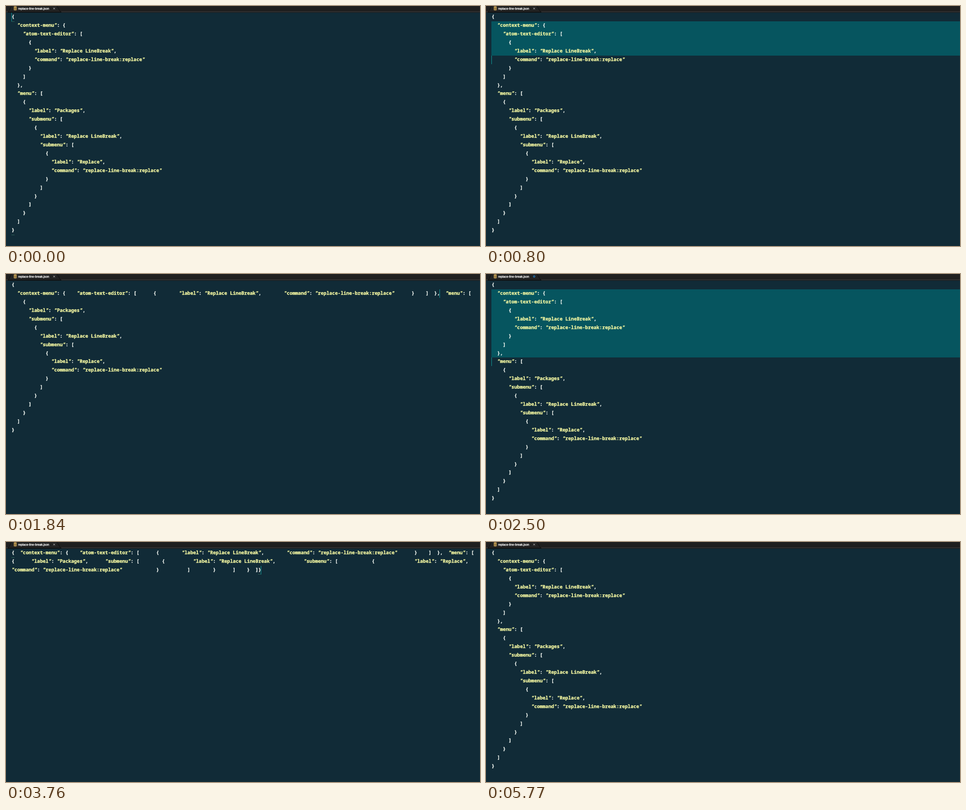
An HTML page that plays this animation: 1053 by 532 pixels, repeating every 5870 ms.

```html
<!DOCTYPE html>
<html lang="en">
<head>
<meta charset="utf-8">
<title>Replace line breaks</title>
<style>
  html, body { margin: 0; width: 100%; height: 100%; overflow: hidden; background: #112b37; }
  #stage { position: relative; width: 1053px; height: 532px; overflow: hidden; }
  #stage > * { position: absolute; }
  #tabs { left: 0; top: 0; }
  #tabs text { font: 6.8px "Liberation Sans", Arial, sans-serif; fill: #fff; stroke: #fff; stroke-width: .3px; text-rendering: geometricPrecision; }
  #code {
    left: 12.4px; top: 15.2px; width: 1040px; margin: 0;
    font: 600 10.5px/18.92px "Noto Sans Mono", "DejaVu Sans Mono", monospace;
    text-rendering: geometricPrecision;
    -webkit-text-stroke: .3px;
    white-space: pre-wrap; color: #f8fcf6;
  }
  #code span { color: #f8fba4; }
  #code i { position: relative; left: -.9px; }
  #selection { left: 12px; right: 0; background: #06555f; }
  #cursor { width: 1px; height: 19px; background: #109c9c; }
  .match { width: 7px; height: 1px; background: #2f6358; }
</style>
</head>
<body>
<div id="stage">
  <svg id="tabs" width="1053" height="15">
    <rect width="1053" height="15" fill="#1f1f1f"/>
    <path d="M0 13H1053" stroke="#484848"/>
    <path d="M0 14.4H1053" stroke="#111a1e"/>
    <path d="M4 13.5C8 12 10 1 14 -1H111C116 1 118 12 123 13.5Z" fill="#222" stroke="#0c0c0c"/>
    <g fill="#e9b95c">
      <ellipse cx="20.5" cy="2.3" rx="3.4" ry="1.3"/>
      <path id="disk" d="M17.1 3.4Q20.5 5.6 23.9 3.4V4.7Q20.5 6.8 17.1 4.7Z"/>
      <use href="#disk" y="2"/>
      <use href="#disk" y="4"/>
    </g>
    <text x="27" y="7.8">replace-line-break.json</text>
    <path id="close" d="M105 3.7L108.8 7.5M108.8 3.7L105 7.5" stroke="#d4d4d4" stroke-width=".9"/>
    <circle id="modified" cx="107" cy="5.6" r="1.8" fill="none" stroke="#2189d8" stroke-width="1.2"/>
  </svg>
  <div id="selection"></div>
  <pre id="code"></pre>
  <div class="match"></div>
  <div class="match"></div>
  <div id="cursor"></div>
</div>
<script>
const LOOP = 5870, LEFT = 12.4, TOP = 15.2, ROW = 18.92, COL = 6.3;

const lines = `{
  "context-menu": {
    "atom-text-editor": [
      {
        "label": "Replace LineBreak",
        "command": "replace-line-break:replace"
      }
    ]
  },
  "menu": [
    {
      "label": "Packages",
      "submenu": [
        {
          "label": "Replace LineBreak",
          "submenu": [
            {
              "label": "Replace",
              "command": "replace-line-break:replace"
            }
          ]
        }
      ]
    }
  ]
}`.split("\n");

const join = (from, to) =>
  [...lines.slice(0, from), lines.slice(from, to).join(""), ...lines.slice(to)].join("\n");
const full = lines.join("\n"), partial = join(1, 10), single = join(0, lines.length);
const partialEnd = lines.slice(1, 9).join("").length;

// Cursor is [row, column]; selected is the row after the selection, which starts at row 1.
const steps = [
  { at: 0, cursor: [0, 0], matches: [[0, 0], [25, 0]] },
  { at: 300, cursor: [1, 0] },
  ...[[500, 2], [650, 3], [800, 5], [950, 6], [1100, 7], [1240, 8], [1390, 9]]
    .map(([at, row]) => ({ at, cursor: [row, 0], selected: row })),
  { at: 1840, text: partial, cursor: [1, partialEnd] },
  { at: 2500, cursor: [9, 0], selected: 9 },
  { at: 3010, cursor: [8, 0] },
  { at: 3760, text: single, cursor: [2, 88], matches: [[0, 0], [2, 87]] },
  { at: 4600, cursor: [8, 0] },
  { at: 5770 }
];

const byId = id => document.getElementById(id);
const code = byId("code"), cursor = byId("cursor"), selection = byId("selection");
const marks = document.querySelectorAll(".match");
const rowY = row => TOP + row * ROW;
const show = (element, visible) => { element.style.display = visible ? "" : "none"; };
const place = (element, x, y) => {
  element.style.left = x + "px";
  element.style.top = y + "px";
};

let current;
function render(step) {
  const { text = full, matches = [], selected } = step;
  code.innerHTML = text.replace(/"(.*?)"/g, '<span><i>"</i>$1<i>"</i></span>');

  show(cursor, step.cursor);
  if (step.cursor) {
    const [row, col] = step.cursor;
    place(cursor, Math.floor(LEFT + col * COL), Math.round(rowY(row)));
  }

  show(selection, selected);
  if (selected) {
    const top = Math.round(rowY(1));
    selection.style.top = top + "px";
    selection.style.height = Math.round(rowY(selected)) - top + "px";
  }

  marks.forEach((mark, i) => {
    show(mark, matches[i]);
    if (matches[i]) {
      const [row, col] = matches[i];
      place(mark, Math.floor(LEFT + col * COL), Math.floor(rowY(row + 1)));
    }
  });
}

function frame() {
  const t = performance.now() % LOOP;
  const step = steps.findLast(s => s.at <= t);
  if (step !== current) render(current = step);
  const modified = (t >= 2140 && t < 2800) || (t >= 4060 && t < 4900);
  show(byId("modified"), modified);
  show(byId("close"), !modified);
  requestAnimationFrame(frame);
}
frame();
</script>
</body>
</html>
```
